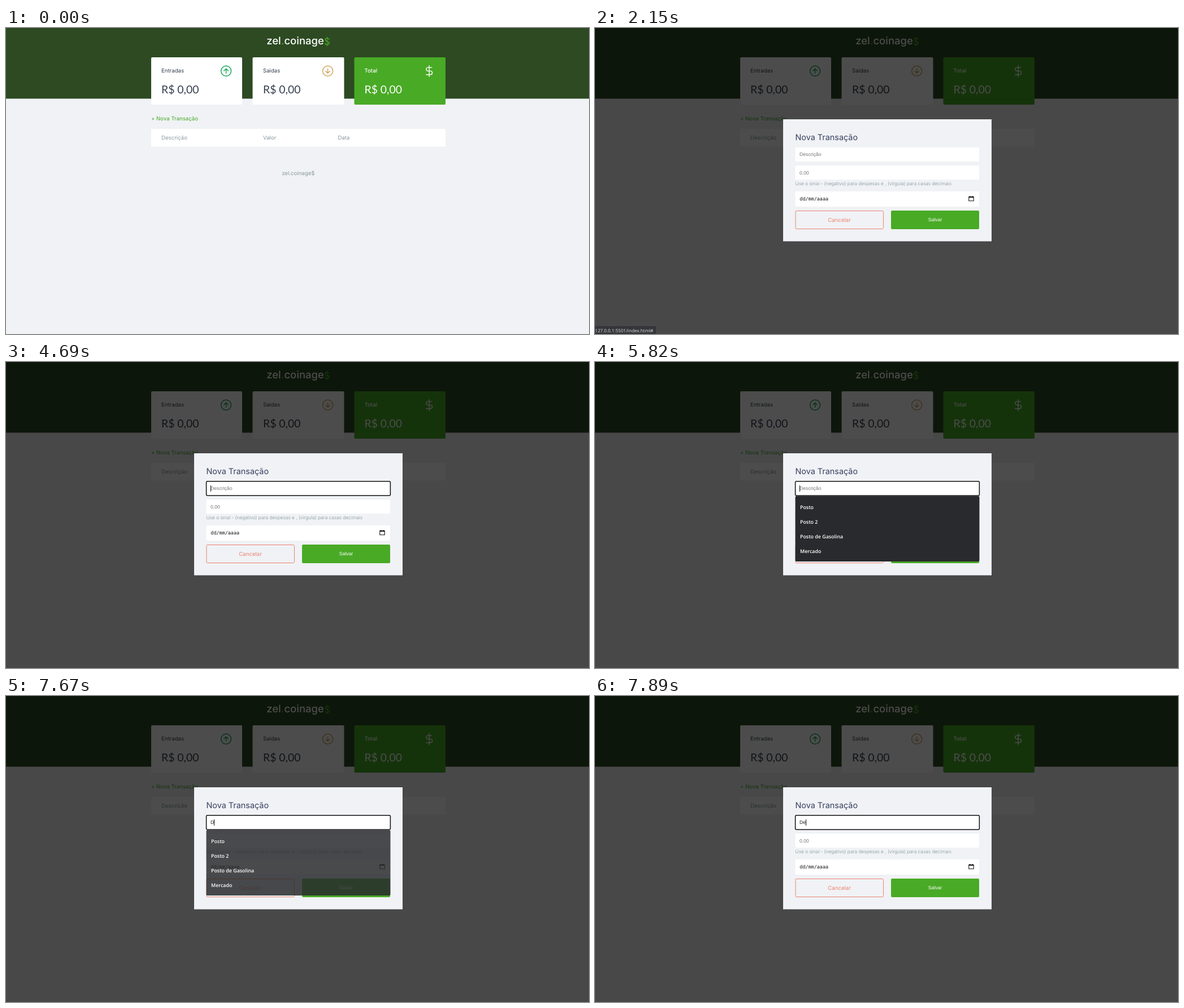
An HTML page that plays this animation: 1032 by 543 pixels, repeating every 8 s.

```html
<!DOCTYPE html>
<html lang="pt-BR">
<head>
<meta charset="utf-8">
<title>zel.coinage$</title>
<style>
  html, body { margin: 0; width: 100%; height: 100%; overflow: hidden; background: #f0f2f5; }
  svg { display: block; width: 1032px; height: 543px; }
  text { font: 400 9.65px Inter, sans-serif; text-rendering: geometricPrecision; }

  .brand { font-size: 18.5px; font-weight: 500; fill: #fff; text-anchor: middle; }
  .brand .accent { fill: #49aa26; }
  .brand .light { font-size: 17px; font-weight: 400; }
  .card { fill: #fff; }
  .label, .amount { fill: #363f4f; }
  .amount { font: 400 19.4px Lato, sans-serif; }
  .total .card { fill: #49aa26; }
  .total text { fill: #fff; }
  .total .label { font-weight: 500; }
  .icon { fill: none; stroke-width: 1.4; stroke-linecap: round; stroke-linejoin: round; }
  .muted { fill: #8a999f; }
  .center { text-anchor: middle; }
  .link { fill: #49aa26; }

  .title { font-size: 14.4px; fill: #363f5f; }
  .field { fill: #fff; }
  .input { font: 400 8.67px "Liberation Sans", Arial, sans-serif; fill: #757575; }
  .typed { fill: #222; }
  .hint { font-size: 8.35px; font-weight: 300; fill: #7e9298; }
  .date { font: 400 8.45px "DejaVu Sans Mono", monospace; fill: #111; }
  .cancel { fill: #ee8272; }
  .save { fill: #fff; }
  .option { font: 600 8.85px "Open Sans", sans-serif; fill: #fff; }
  .status { font: 400 8.1px "Open Sans", sans-serif; fill: #dfe1e5; }

  /* Everything changes in hard steps on one 8 s clock. */
  .link, .modal, .tip, .focus, .caret, .list, .panel, .placeholder, .first, .second {
    animation: 8s step-end infinite;
  }
  .modal, .tip, .focus, .caret, .list, .first, .second { opacity: 0; }

  .link { animation-name: hover; }
  @keyframes hover {
    0%, 100% { fill: #49aa26; }
    16.625% { fill: #49d232; }
    26.875% { fill: #49aa26; }
  }
  .modal { animation-name: open; }
  @keyframes open {
    0%, 100% { opacity: 0; }
    26.875% { opacity: 1; }
  }
  .tip { animation-name: tip; }
  @keyframes tip {
    0%, 100% { opacity: 0; }
    19.125% { opacity: .5; }
    20% { opacity: 1; }
    29.375% { opacity: .65; }
    30.25% { opacity: .3; }
    31% { opacity: 0; }
  }
  .focus { animation-name: focus; }
  @keyframes focus {
    0%, 100% { opacity: 0; }
    58.625% { opacity: 1; }
  }
  .caret { animation-name: caret; }
  @keyframes caret {
    0%, 66%, 78.5%, 91.75%, 100% { opacity: 0; transform: none; }
    58.625%, 72.75%, 85.125% { opacity: 1; transform: none; }
    95.875% { opacity: 1; transform: translateX(6px); }
    96.875% { opacity: 1; transform: translateX(11px); }
  }
  .list { animation-name: list; }
  @keyframes list {
    0%, 100% { opacity: 0; transform: none; }
    59.5% { opacity: 1; transform: none; }
    95.875% { opacity: .85; transform: none; }
    96.875% { opacity: .43; transform: translate(5px, 2px); }
    97.75% { opacity: .12; transform: translate(5px, 2px); }
    98.625% { opacity: 0; transform: none; }
  }
  .panel { animation-name: panel; }
  @keyframes panel {
    0%, 100% { width: 326px; }
    96.875% { width: 319.5px; }
  }
  .placeholder { animation-name: clear; }
  @keyframes clear {
    0%, 100% { opacity: 1; }
    95.875% { opacity: 0; }
  }
  .first { animation-name: first; }
  @keyframes first {
    0%, 100% { opacity: 0; }
    95.875% { opacity: 1; }
  }
  .second { animation-name: second; }
  @keyframes second {
    0%, 100% { opacity: 0; }
    96.875% { opacity: 1; }
  }
</style>
</head>
<body>
<svg viewBox="0 0 1032 543">
  <rect width="1032" height="543" fill="#f0f2f5"/>
  <rect width="1032" height="125.4" fill="#2d4a22"/>
  <text class="brand" x="517.5" y="28.7">zel<tspan class="accent">.</tspan>coinage<tspan class="accent light" dy=".8">$</tspan></text>

  <g>
    <rect class="card" x="257" y="52" width="161" height="84" rx="2"/>
    <text class="label" x="275" y="79.3">Entradas</text>
    <text class="amount" x="275" y="115.5">R$ 0,00</text>
    <g class="icon" stroke="#12a454" transform="translate(389.6 76.3)">
      <circle r="9"/>
      <path d="M0 4V-4M-3.7-.3L0-4L3.7-.3"/>
    </g>
  </g>
  <g>
    <rect class="card" x="436.5" y="52" width="162" height="84" rx="2"/>
    <text class="label" x="455" y="79.3">Saidas</text>
    <text class="amount" x="455" y="115.5">R$ 0,00</text>
    <g class="icon" stroke="#cfa45c" transform="translate(569.6 76.3)">
      <circle r="9"/>
      <path d="M0-4V4M-3.7.3L0 4L3.7.3"/>
    </g>
  </g>
  <g class="total">
    <rect class="card" x="616.5" y="52" width="161.5" height="84" rx="2"/>
    <text class="label" x="634.5" y="79.3">Total</text>
    <text class="amount" x="634.5" y="115.5">R$ 0,00</text>
    <path class="icon" stroke="#fff" transform="translate(749.2 76.4)"
      d="M0-9.8V9.8M4.6-6.3H-2.2A3.15 3.15 0 0 0-2.2 0H2.2A3.15 3.15 0 0 1 2.2 6.3H-5.4"/>
  </g>

  <text class="link" x="257" y="163.7">+ Nova Transação</text>
  <rect x="257" y="179" width="521" height="31.5" fill="#fff"/>
  <g class="muted">
    <text x="275" y="198">Descrição</text>
    <text x="455" y="198">Valor</text>
    <text x="587.5" y="198">Data</text>
    <text class="center" x="517.3" y="260.8">zel.coinage$</text>
  </g>

  <g class="modal">
    <rect width="1032" height="543" fill="#000" opacity=".7"/>
    <rect x="333" y="162" width="369" height="216.5" fill="#f0f2f5"/>
    <text class="title" x="354.5" y="199.3">Nova Transação</text>

    <rect class="field" x="354.5" y="212" width="325.5" height="25" rx="1.5"/>
    <rect class="field" x="354.5" y="244" width="325.5" height="25" rx="1.5"/>
    <rect class="field" x="354.5" y="290" width="325.5" height="27" rx="1.5"/>
    <text class="input placeholder" x="362" y="227.4">Descrição</text>
    <text class="input typed first" x="362" y="227.4">D</text>
    <text class="input typed second" x="368.26" y="227.4">e</text>
    <text class="input" x="362" y="260">0,00</text>
    <text class="hint" x="354.5" y="279">Use o sinal - (negativo) para despesas e , (vírgula) para casas decimais</text>
    <text class="date" x="362.3" y="306.4">dd/mm/aaaa</text>
    <path d="M661.8 299.6h8.4v7.2h-8.4zM661.3 300.4h9.4M663.6 298v1.5M668.4 298v1.5" fill="none" stroke="#111" stroke-width="1.1"/>

    <rect x="355" y="324.5" width="155.5" height="32" rx="2" fill="none" stroke="#ee8272"/>
    <text class="cancel center" x="432.6" y="343.5">Cancelar</text>
    <rect x="524" y="324" width="156" height="33" rx="2" fill="#49aa26"/>
    <text class="input save center" x="602" y="343.2">Salvar</text>

    <rect class="focus" x="354.6" y="211.8" width="325.8" height="25.2" rx="2" fill="none" stroke="#101010" stroke-width="1.5"/>
    <rect class="caret" x="362" y="219" width="1" height="11" fill="#111"/>

    <g class="list">
      <rect class="panel" x="354.5" y="238" width="326" height="116" rx="2" fill="#292a2d"/>
      <text class="option" x="363" y="260.5">Posto</text>
      <text class="option" x="363" y="286.5">Posto 2</text>
      <text class="option" x="363" y="312.5">Posto de Gasolina</text>
      <text class="option" x="363" y="338.5">Mercado</text>
    </g>
  </g>

  <g class="tip">
    <path d="M0 529H106a2 2 0 0 1 2 2V543H0z" fill="#35363a"/>
    <text class="status" x="0" y="540">127.0.0.1:5501/index.html#</text>
  </g>
</svg>
</body>
</html>
```
